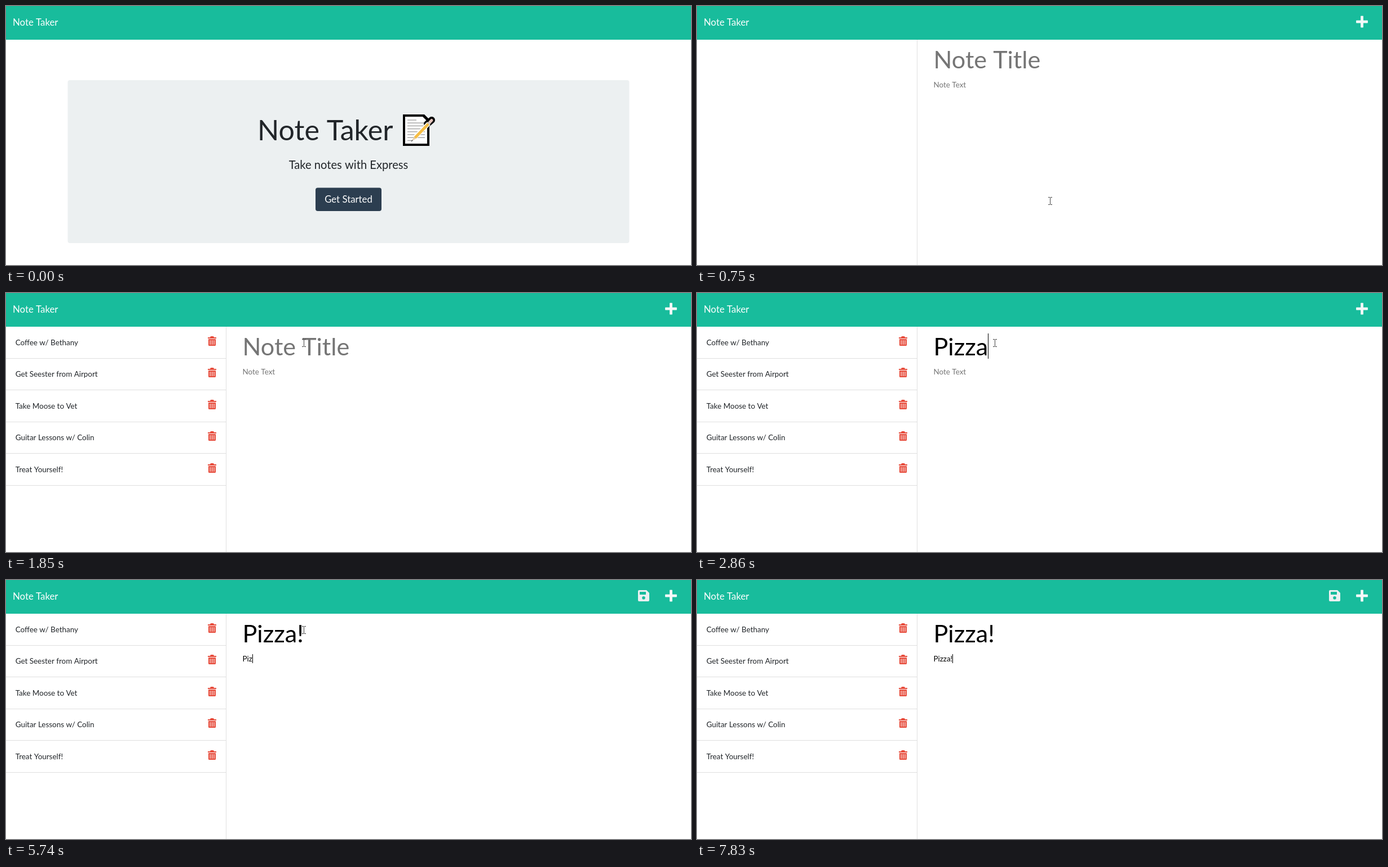
Animation, 1215 px wide and 461 px high, one loop 8 s. Source, as an HTML page with a canvas:

```html
<!DOCTYPE html>
<html lang="en">
<head>
<meta charset="utf-8">
<title>Note Taker</title>
<style>
  html, body { margin: 0; width: 100%; height: 100%; overflow: hidden; background: #fff; }
  canvas { display: block; }
</style>
</head>
<body>
<canvas id="stage" width="1215" height="461"></canvas>
<script>
const ctx = document.getElementById('stage').getContext('2d');
const LOOP = 8000, STEP = 68.3;
const NOTES = ['Coffee w/ Bethany', 'Get Seester from Airport', 'Take Moose to Vet',
  'Guitar Lessons w/ Colin', 'Treat Yourself!'];
const WORD = 'Pizza!';
const TITLE_KEYS = [2120, 2250, 2380, 2580, 2860, 3800];
const BODY_KEYS = [5210, 5340, 5740, 5940, 6140, 6620];
const CARET_ON = [[1310, 1850], [2120, 3400], [3800, 4350], [4610, 5140], [5210, 7160], [7690, 8000]];
const HOVER = 410, PRESS = 610, EDITOR = 750, LIST = 820, TAB = 4610, SAVE = 5340;

// Pointer path: time, x, y
const POINTER = [
  [70, 742, 455], [210, 690, 405], [340, 648, 368], [410, 634, 357], [540, 626, 351], [690, 626, 351],
  [745, 626, 347], [760, 626, 347], [819, 612, 288], [890, 590, 232], [960, 565, 175], [1030, 545, 130],
  [1100, 535, 105], [1310, 529, 92], [1430, 528, 89], [7540, 528, 89], [7560, 620, 74],
  [7630, 800, 48], [7700, 1000, 26], [7760, 1150, 4]
];

function rect(x, y, w, h, color, r = 0) {
  ctx.fillStyle = color;
  ctx.beginPath();
  ctx.roundRect(x, y, w, h, r);
  ctx.fill();
}

function text(str, x, y, size, color, align = 'left') {
  ctx.font = `${size}px Lato, sans-serif`;
  ctx.textAlign = align;
  ctx.fillStyle = color;
  ctx.fillText(str, x, y);
}

function line(x1, y1, x2, y2, width, color, cap = 'butt') {
  ctx.lineWidth = width;
  ctx.strokeStyle = color;
  ctx.lineCap = cap;
  ctx.beginPath();
  ctx.moveTo(x1, y1);
  ctx.lineTo(x2, y2);
  ctx.stroke();
}

function shape(d, x, y, fill, stroke, width = 1) {
  const path = new Path2D(d);
  ctx.save();
  ctx.translate(x, y);
  ctx.lineJoin = 'round';
  ctx.fillStyle = fill;
  ctx.fill(path, 'evenodd');
  if (stroke) {
    ctx.lineWidth = width;
    ctx.strokeStyle = stroke;
    ctx.stroke(path);
  }
  ctx.restore();
}

function memo(x, y) {
  ctx.save();
  ctx.translate(x, y);
  shape('M0 0H38L47 9V56H0Z', 0, 0, '#000');
  shape('M4 4H35L43 12V52H4Z', 0, 0, '#fff');
  for (let i = 0; i < 8; i++) {
    const end = i === 0 ? 24 : i === 7 ? 17 : 39;
    line(8, 10 + i * 5.2, end, 10 + i * 5.2, 1.5, '#a8a8a8');
  }
  line(43, 17, 51, 10, 12, '#000', 'round');
  line(22, 40, 46, 16, 8, '#fff');
  line(21.5, 41.5, 46, 16, 5, '#f6bd45');
  line(45, 17, 48, 14, 5, '#c9c9c9');
  line(48, 13.5, 51, 10.5, 5, '#e5c5bd', 'round');
  shape('M19.5 40L23 43.5L16 47Z', 0, 0, '#e8d2ad');
  line(15, 48, 17.5, 45.5, 1.5, '#666');
  ctx.restore();
}

function trash(x, y) {
  const red = '#e74c3c';
  shape('M4 2L5 0H10L11 2H15V4H0V2Z', x, y, red);
  rect(x + 1, y + 5, 13, 12, red, [0, 0, 1.5, 1.5]);
  for (const dx of [3.6, 7, 10.4]) rect(x + dx, y + 7, 1.1, 8, '#fff');
}

function landing(t) {
  rect(109.5, 132, 996, 290, '#ecf0f1', 4);
  text('Note Taker', 446, 239, 50.2, '#212529');
  memo(704, 193);
  text('Take notes with Express', 607.5, 290, 20.16, '#212529', 'center');
  if (t >= PRESS) rect(546.5, 321, 122, 46.5, '#95a0aa', 6);
  rect(549, 323.5, 117, 41.5, t >= PRESS ? '#1a252f' : t >= HOVER ? '#1e2b37' : '#2c3e50', 4);
  text('Get Started', 607.5, 350, 16.8, '#fff', 'center');
}

function field(value, hint, x, base, size) {
  text(value || hint, x, base, size, value ? '#000' : '#757575');
  return Math.floor(420 + (value ? ctx.measureText(value).width : 0));
}

const typed = (keys, t) => WORD.slice(0, keys.filter(k => k <= t).length);

function editor(t) {
  rect(390, 60, 1, 401, '#dfdfdf');
  shape('M8 0H12V8H20V12H12V20H8V12H0V8H8Z', 1169.5, 18, '#f4f8f8', '#f4f8f8', 0.8);
  if (t >= SAVE) {
    shape('M2 0H15L20 5V18Q20 20 18 20H2Q0 20 0 18V2Q0 0 2 0ZM3 3V8H14V3ZM10 11A2.8 2.8 0 1 0 10 16.6A2.8 2.8 0 1 0 10 11Z',
      1121, 18, '#ecf0f1');
  }
  if (t >= LIST) NOTES.forEach((note, i) => {
    const y = Math.round(60 + i * 56.4);
    text(note, 16.7, y + 33, 13.44, '#212529');
    trash(358, y + 17);
    rect(0, y + 56, 390, 1, '#dfdfdf');
  });
  const titleEnd = field(typed(TITLE_KEYS, t), 'Note Title', 419.5, 111, 43.2);
  const bodyEnd = field(typed(BODY_KEYS, t), 'Note Text', 419.5, 145, 13.44);
  if (CARET_ON.some(([on, off]) => t >= on && t < off)) {
    if (t < TAB) rect(titleEnd, 72, 1, 45, '#000');
    else rect(bodyEnd, 132, 1, 16, '#000');
  }
}

function pointerAt(t) {
  const i = POINTER.findIndex(p => p[0] > t);
  if (i < 0) return POINTER.at(-1).slice(1);
  if (i === 0) return POINTER[0].slice(1);
  const [t0, x0, y0] = POINTER[i - 1], [t1, x1, y1] = POINTER[i];
  const k = (t - t0) / (t1 - t0);
  return [Math.round(x0 + (x1 - x0) * k), Math.round(y0 + (y1 - y0) * k)];
}

function pointer(t) {
  if (t < 70 || (t >= 7420 && t < 7560) || t >= 7830) return;
  const [x, y] = pointerAt(Math.floor(t / STEP + 0.01) * STEP + 2);
  if (t >= EDITOR && y >= 60) {
    rect(x, y - 6, 1, 12, '#444');
    for (const dy of [-7, 6]) {
      rect(x - 3, y + dy, 3, 1, '#444');
      rect(x + 1, y + dy, 3, 1, '#444');
    }
  } else if (t >= HOVER && t < EDITOR) {
    shape('M-2 1.5Q-2-.5 0-.5T2 1.5V7Q4.5 6 5 8Q7 7 7.7 9Q9.5 8.5 9.5 10.5V14Q9.5 17 7.5 20.5H-.5Q-1.5 17.5-5 13.5Q-6.5 11-4.8 10.2Q-3.5 10-2 12Z',
      x, y, '#fff', '#111', 1.1);
    for (const [dx, top] of [[2, 7], [5, 8], [7.5, 9]]) line(x + dx, y + top, x + dx, y + top + 3, 0.8, '#111');
  } else {
    shape('M0 0V17L4 13.2L6.6 19L9 18L6.5 12.3H12Z', x, y, '#fff', '#111');
  }
}

function draw(now) {
  const t = now % LOOP;
  rect(0, 0, 1215, 461, '#fff');
  rect(0, 0, 1215, 60, '#18bc9c');
  text('Note Taker', 12, 35, 16.8, '#fff');
  (t < EDITOR ? landing : editor)(t);
  pointer(t);
}

const start = performance.now();
function tick() {
  draw(performance.now() - start);
  requestAnimationFrame(tick);
}
tick();
</script>
</body>
</html>
```
